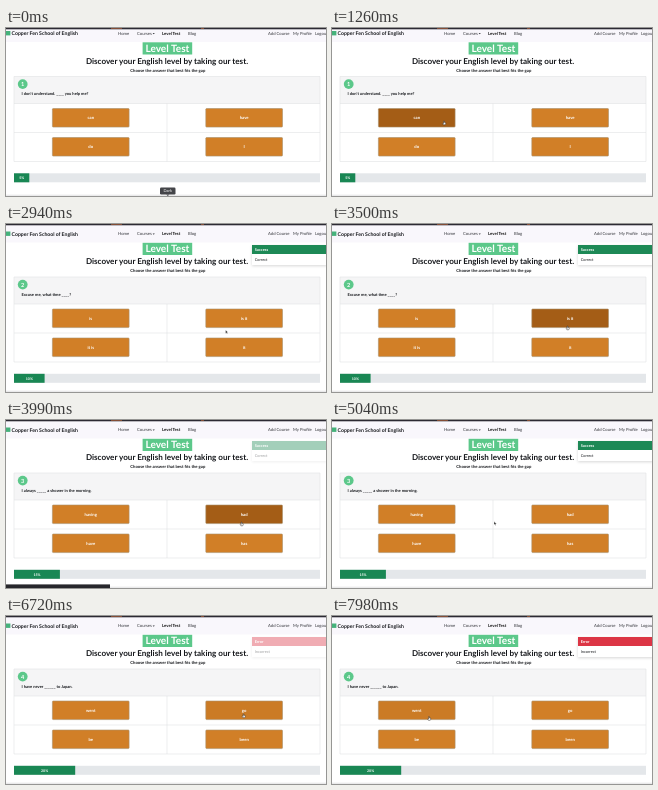
Write an HTML page that moves like this. It is 320x168 px and loops after 8000 ms.

```html
<!DOCTYPE html>
<html lang="en">
<head>
<meta charset="utf-8">
<title>Level test</title>
<style>
html, body { margin: 0; height: 100%; overflow: hidden; background: #fff; }
svg { display: block; width: 100vw; height: 100vh; }
text { font: 700 4.2px Lato, "Open Sans", sans-serif; fill: #16181c; text-rendering: geometricPrecision; white-space: pre; }
.nav text { font-weight: 400; fill: #33343a; }
.nav .on { font-weight: 700; fill: #111; }
.mid { text-anchor: middle; }
.white { fill: #fff; }
.line { fill: none; stroke: #e1e2e4; stroke-width: .6; }
#toast { filter: drop-shadow(0 1.5px 1.5px rgb(0 0 0 / .16)); }
</style>
</head>
<body>
<svg viewBox="0 0 320 168">
  <rect width="320" height="168" fill="#fff"/>
  <g id="page">
    <g class="nav">
      <rect width="320" height="18.5" fill="#f9f7fc"/>
      <rect y="7.5" width="4.4" height="4.4" fill="#45b27b"/>
      <text x="5.6" y="11.5" style="font-size:5.15px;font-weight:700;fill:#16181c">Copper Fen School of English</text>
      <text x="112" y="11.4">Home</text>
      <text x="131" y="11.4">Courses</text>
      <path d="M146.6 9.5h2.2l-1.1 1.2z" fill="#33343a"/>
      <text x="156" y="11.4" class="on">Level Test</text>
      <text x="182" y="11.4">Blog</text>
      <text x="262" y="11.4">Add Course</text>
      <text x="287" y="11.4">My Profile</text>
      <text x="309" y="11.4">Logout</text>
    </g>
    <rect x="136.6" y="18.8" width="49.6" height="12.2" fill="#5cc88a"/>
    <text x="161.4" y="28.4" class="mid white" style="font-size:10.1px">Level Test</text>
    <text x="161" y="40" class="mid" style="font-size:8.1px">Discover your English level by taking our test.</text>
    <text x="161.8" y="48.2" class="mid">Choose the answer that best fits the gap</text>

    <rect x="8" y="53" width="306" height="27" fill="#f5f5f6"/>
    <path class="line" d="M8 53H314V138H8ZM8 80H314M8 109H314M161 80V138"/>
    <circle cx="16.7" cy="60.6" r="4.9" fill="#5cc88a"/>
    <text id="badge" x="16.7" y="62.6" class="mid white" style="font-size:5.6px"></text>
    <text id="question" x="15.5" y="71.7" style="font-size:4.05px"></text>
    <g id="buttons"></g>

    <rect x="8" y="149.8" width="306" height="9" fill="#e4e7ea"/>
    <rect id="bar" x="8" y="149.8" height="9" fill="#198754"/>
    <text id="percent" y="155.6" class="mid white" style="font-size:3.6px"></text>
  </g>

  <g id="toast">
    <rect x="246" y="21" width="75" height="20" fill="#fff"/>
    <rect id="toastHead" x="246" y="21" width="75" height="9"/>
    <text id="toastTitle" x="248.7" y="27" class="white" style="font-size:3.9px"></text>
    <text id="toastBody" x="248.7" y="37" style="font-size:3.9px;font-weight:400"></text>
  </g>

  <rect width="320" height="1.3" fill="#2c2a33"/>
  <path d="M105 0h11M195 0h3" stroke="#d9713a" stroke-width="1"/>
  <rect y="166.8" width="320" height=".7" fill="#d5d5d8"/>
  <rect id="status" y="164.4" width="104" height="3.6" fill="#27272c"/>
  <g id="tip" fill="#444549">
    <rect x="154" y="159.5" width="15.5" height="7" rx="1.2"/>
    <path d="M160.2 166.4h3.2l-1.6 1.5z"/>
    <text x="161.7" y="164.4" class="mid white" style="font-size:4px;font-weight:400">Dark</text>
  </g>
  <path id="cursor" stroke-width=".45" stroke-linejoin="round"/>
</svg>
<script>
const LOOP = 8000;
const $ = id => document.getElementById(id);

const steps = [
  { at: 0, text: "I don't understand. ____ you help me?", answers: ["can", "have", "do", "I"] },
  { at: 1960, text: "Excuse me, what time ____?", answers: ["is", "is it", "it is", "it"] },
  { at: 3780, text: "I always _____ a shower in the morning.", answers: ["having", "had", "have", "has"] },
  { at: 6440, text: "I have never ______ to Japan.", answers: ["went", "go", "be", "been"] }
];
const toasts = [
  { from: 2100, to: 3780, title: "Success", body: "Correct", color: "#1d8956" },
  { from: 3850, to: 6440, title: "Success", body: "Correct", color: "#1d8956" },
  { from: 6580, to: LOOP, title: "Error", body: "Incorrect", color: "#dc3545" }
];
// time, x, y
const path = [
  [70, 165, 172], [770, 112, 93], [1110, 112, 93], [1120, 113, 92], [1250, 113, 92], [1260, 112, 93],
  [2500, 112, 93], [2730, 219.5, 106], [2940, 219.5, 106], [3500, 235.5, 102], [4690, 235.5, 102],
  [5040, 162, 101.5], [5320, 162, 101.5], [5600, 150, 94], [6090, 224, 130], [6300, 224, 130],
  [6860, 240, 92], [7490, 240, 92], [7840, 100, 108], [7980, 97, 100.5]
];
const ARROW = "M0 0V3.6L.9 2.8 1.5 4 2.1 3.7 1.5 2.6H2.6Z";
const HAND = "M-.3 0H.3V1.3L1.7 1.7V2.9L1.2 3.8H-.6L-1.4 2.4 -1 2 -.3 2.5Z";
const W = 76.7, H = 18.6;

const clamp = v => Math.min(1, Math.max(0, v));
const mix = (a, b, k) => a + (b - a) * k;

const buttons = [0, 1, 2, 3].map(i => {
  const x = i % 2 ? 199.8 : 46.4, y = i < 2 ? 85 : 114;
  const g = document.createElementNS("http://www.w3.org/2000/svg", "g");
  g.innerHTML = `<rect x="${x}" y="${y}" width="${W}" height="${H}" rx=".8"/>
    <text x="${x + W / 2}" y="${y + 10.7}" class="mid white"></text>`;
  $("buttons").append(g);
  return { x, y, rect: g.children[0], label: g.children[1] };
});

function cursorAt(t) {
  const i = path.findIndex(p => p[0] > t);
  if (i === 0) return path[0].slice(1);
  if (i < 0) return path.at(-1).slice(1);
  const [a, b] = [path[i - 1], path[i]];
  const k = (t - a[0]) / (b[0] - a[0]), e = k * k * (3 - 2 * k);
  return [mix(a[1], b[1], e), mix(a[2], b[2], e)];
}

const scrollAt = t => t < steps[1].at ? -4.5 : 0;

function isOver(b, t) {
  const [x, y] = cursorAt(t), dy = y - scrollAt(t) - b.y;
  return x >= b.x && x <= b.x + W && dy >= 0 && dy <= H;
}

// Share of the last 150 ms spent over the button, eased
function hover(b, t) {
  let n = 0;
  for (let k = 0; k < 10; k++) n += isOver(b, t - k * 15);
  const stale = t >= steps[1].at && t < 2600;
  return (n / 10) ** 3 * (stale ? .15 : 1);
}

function draw(t) {
  const n = steps.findLastIndex(s => t >= s.at), step = steps[n];
  const width = 15.3 * (n + 1);
  $("page").setAttribute("transform", `translate(0 ${scrollAt(t)})`);
  $("badge").textContent = n + 1;
  $("question").textContent = step.text;
  $("bar").setAttribute("width", width);
  $("percent").setAttribute("x", 8 + width / 2);
  $("percent").textContent = 5 * (n + 1) + "%";

  buttons.forEach((b, i) => {
    const k = hover(b, t), focus = i === 3 && t >= 6160 && t < steps[3].at;
    b.label.textContent = step.answers[i];
    b.rect.setAttribute("fill", `rgb(${mix(209, 164, k)},${mix(127, 93, k)},${mix(39, 22, k)})`);
    b.rect.setAttribute("stroke", focus ? "#78818b" : "#a8906c");
    b.rect.setAttribute("stroke-width", focus ? 1.2 : .6);
  });

  const toast = toasts.find(o => t >= o.from && t < o.to);
  $("toast").setAttribute("opacity", toast ? clamp((t - toast.from) / 350) : 0);
  if (toast) {
    $("toastHead").setAttribute("fill", toast.color);
    $("toastTitle").textContent = toast.title;
    $("toastBody").textContent = toast.body;
  }

  const loading = t >= 1680 && t < 2520 || t >= 3640 && t < 4270;
  $("status").setAttribute("opacity", +loading);
  $("tip").setAttribute("opacity", +(t < 140));

  const [x, y] = cursorAt(t), hand = buttons.some(b => isOver(b, t));
  $("cursor").setAttribute("d", hand ? HAND : ARROW);
  $("cursor").setAttribute("fill", hand ? "#fff" : "#111");
  $("cursor").setAttribute("stroke", hand ? "#222" : "#fff");
  $("cursor").setAttribute("transform", `translate(${x} ${y})`);
}

const start = performance.now();
function tick() {
  draw((performance.now() - start) % LOOP);
  requestAnimationFrame(tick);
}
tick();
</script>
</body>
</html>
```
